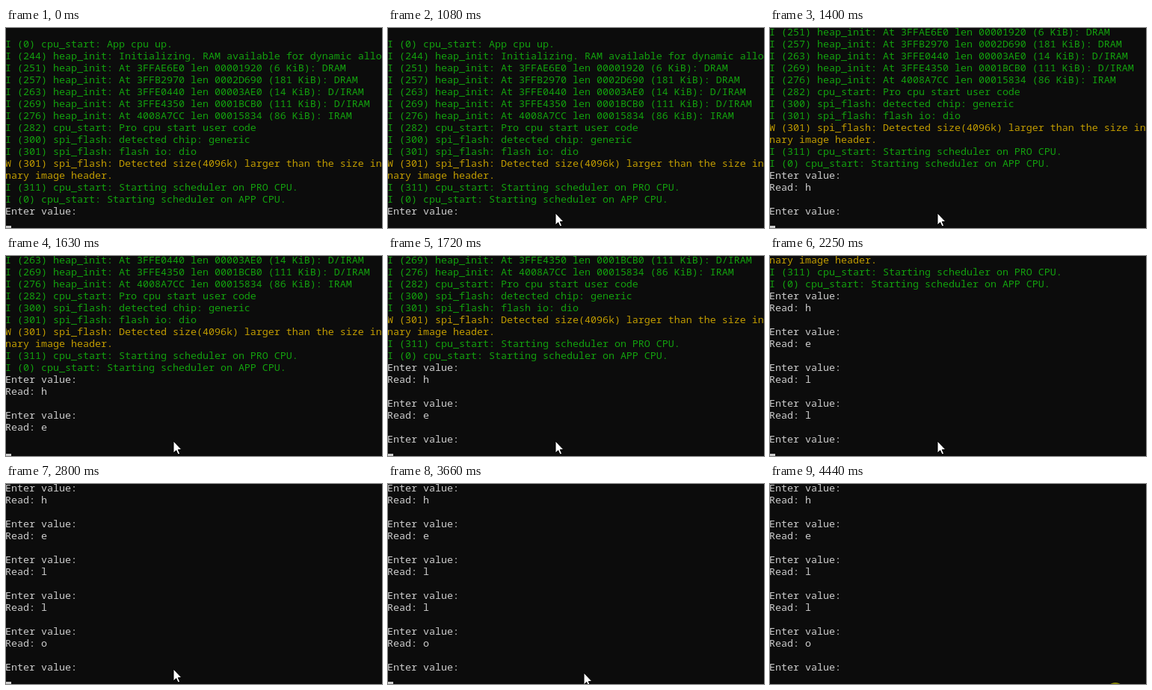
These frames come from a looping animation (503 px wide and 268 px high, 4500 ms). An HTML page:

```html
<!DOCTYPE html>
<html lang="en">
<head>
<meta charset="utf-8">
<title>Serial monitor</title>
<style>
  :root { --loop: 4500ms step-end infinite; }
  html, body { margin: 0; width: 100%; height: 100%; overflow: hidden; background: #0c0c0c; }
  .stage { position: relative; width: 503px; height: 268px; overflow: hidden; background: #0c0c0c; }

  /* The console grid: 8 x 16 px cells, shifted by (-1, -3) */
  .view { position: absolute; left: 0; top: -3px; width: 503px; height: 256px; overflow: hidden; }
  .log {
    position: absolute; left: -1px; top: 0; margin: 0;
    font: 13.3333px/16px "Noto Sans Mono", "DejaVu Sans Mono", monospace;
    color: #13a10e; white-space: pre;
    animation: scroll var(--loop);
  }
  .warn { color: #c19c00; }
  .out { color: #ccc; }
  .caret {
    position: absolute; left: 0; top: 265px; width: 7px; height: 4px;
    background: #ccc; animation: blink var(--loop);
  }

  .pointer { position: absolute; left: 0; top: 0; overflow: visible; animation: move var(--loop); }
  .ring { fill: #ff0; fill-opacity: .5; animation: click var(--loop); }
  .arrow { fill: #fff; stroke: #000; stroke-width: 1; }

  @keyframes scroll {
    0%     { transform: translateY(0); }
    31.11% { transform: translateY(-48px); }
    36.22% { transform: translateY(-80px); }
    38.22% { transform: translateY(-96px); }
    46.66% { transform: translateY(-144px); }
    50%    { transform: translateY(-192px); }
    62.22%, 100% { transform: translateY(-240px); }
  }
  @keyframes blink {
    0%, 31.11%, 94.88% { opacity: 1; }
    24%, 83.11%, 98.66%, 100% { opacity: 0; }
  }
  @keyframes move {
    0%     { transform: translate(221px, 290px); }
    5.11%  { transform: translate(221px, 259px); }
    6.66%  { transform: translate(224px, 250px); }
    11.77% { transform: translate(224px, 248px); }
    79.55% { transform: translate(230px, 249px); }
    81.33% { transform: translate(262px, 253px); }
    83.11% { transform: translate(308px, 259px); }
    84.66% { transform: translate(347px, 264px); }
    86.44%, 100% { transform: translate(462px, 278px); }
  }
  @keyframes click {
    0%, 15.55% { opacity: 0; }
    13.55%, 98.66%, 100% { opacity: 1; }
  }
</style>
</head>
<body>
<div class="stage">
  <div class="view">
<pre class="log">

I (0) cpu_start: App cpu up.
I (244) heap_init: Initializing. RAM available for dynamic allocation:
I (251) heap_init: At 3FFAE6E0 len 00001920 (6 KiB): DRAM
I (257) heap_init: At 3FFB2970 len 0002D690 (181 KiB): DRAM
I (263) heap_init: At 3FFE0440 len 00003AE0 (14 KiB): D/IRAM
I (269) heap_init: At 3FFE4350 len 0001BCB0 (111 KiB): D/IRAM
I (276) heap_init: At 4008A7CC len 00015834 (86 KiB): IRAM
I (282) cpu_start: Pro cpu start user code
I (300) spi_flash: detected chip: generic
I (301) spi_flash: flash io: dio
<span class="warn">W (301) spi_flash: Detected size(4096k) larger than the size in the bi
nary image header.</span>
I (311) cpu_start: Starting scheduler on PRO CPU.
I (0) cpu_start: Starting scheduler on APP CPU.
<span class="out">Enter value:
Read: h

Enter value:
Read: e

Enter value:
Read: l

Enter value:
Read: l

Enter value:
Read: o

Enter value:</span></pre>
  </div>
  <div class="caret"></div>
  <svg class="pointer" width="1" height="1">
    <circle class="ring" r="12"/>
    <path class="arrow" d="M0 0V16L3.7 12.6L6.1 18L8.6 16.9L6.3 11.6H11Z"/>
  </svg>
</div>
</body>
</html>
```
